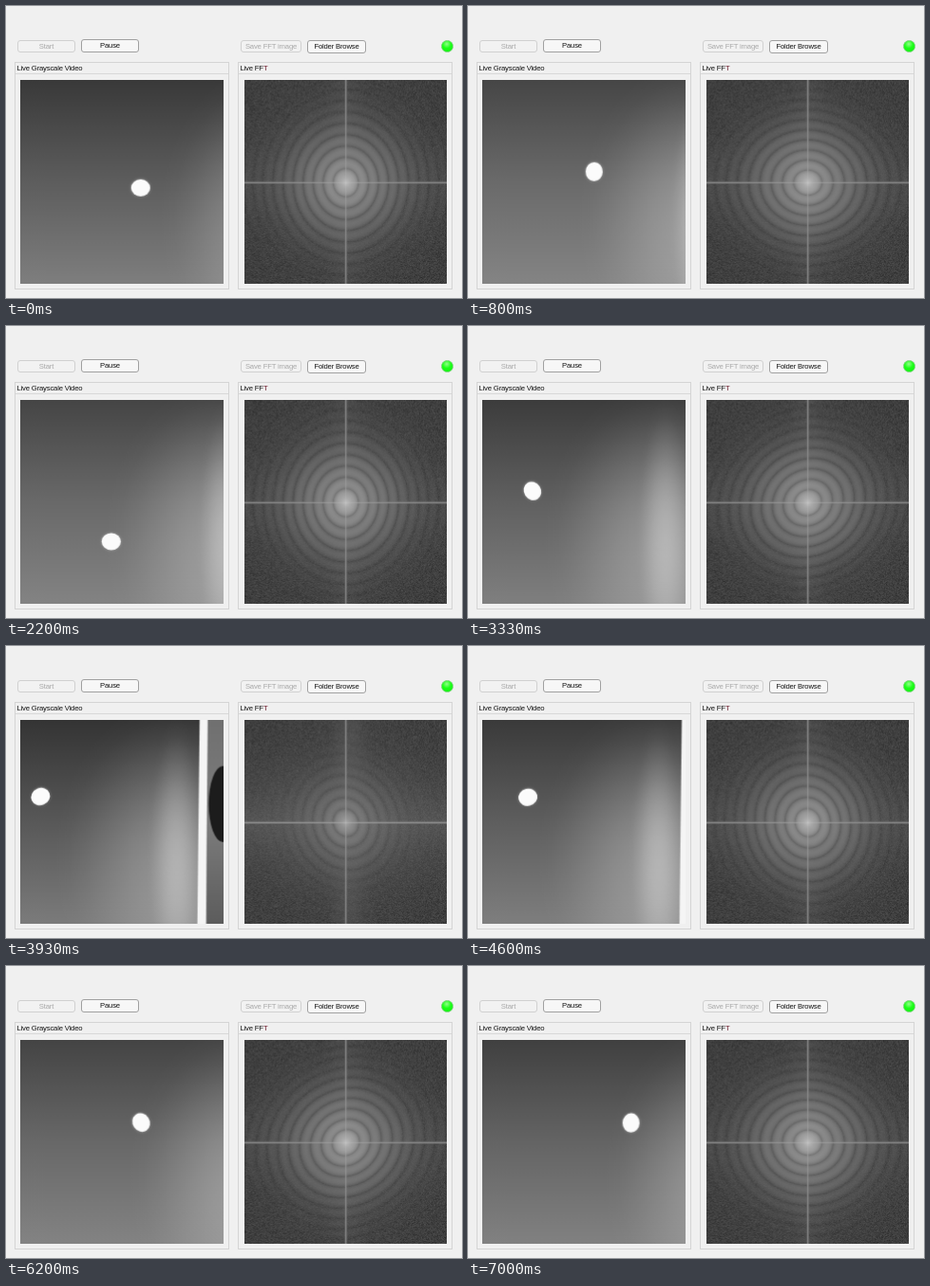
Write an HTML page with a canvas that moves like this. It is 480 px wide and 308 px high and loops after 7070 ms.

```html
<!DOCTYPE html>
<html lang="en">
<head>
<meta charset="utf-8">
<title>Live FFT</title>
<style>
  html, body { margin: 0; width: 480px; height: 308px; overflow: hidden; background: #f0f0f0; }
  body { position: relative; font: 7.7px/12px Arial, "Liberation Sans", sans-serif; letter-spacing: -.18px; color: #111; }
  body > * { position: absolute; box-sizing: border-box; }
  canvas { left: 0; top: 0; }
  .btn { height: 14px; border: 1px solid #a0a0a0; border-radius: 3px; background: #f7f7f7;
         text-align: center; white-space: nowrap; }
  .off { height: 13px; border-color: #d0d0d0; background: #f2f2f2; color: #a8a8a8; line-height: 11px; }
  .panel { top: 59px; width: 226px; height: 240px; border: 1px solid #d4d4d4; }
  .panel div { height: 11px; line-height: 11px; padding-left: 1.5px; border-bottom: 1px solid #d8d8d8; }
  .panel span { color: #6a1a2a; }
  .lamp { left: 457.5px; top: 36px; width: 13px; height: 13px; border-radius: 50%; border: 1px solid #6fd46f;
          background: radial-gradient(circle at 45% 28%, #90ff88, #1cff18 45%, #0cf00c); }
</style>
</head>
<body>
<canvas id="stage" width="480" height="308"></canvas>
<div class="btn off" style="left:12px;top:36px;width:61px">Start</div>
<div class="btn" style="left:79px;top:35px;width:61px">Pause</div>
<div class="btn off" style="left:247px;top:36px;width:64px">Save FFT image</div>
<div class="btn" style="left:317px;top:36px;width:62px">Folder Browse</div>
<div class="lamp"></div>
<div class="panel" style="left:9px"><div>Live Grayscale Video</div></div>
<div class="panel" style="left:244px"><div>Live FF<span>T</span></div></div>
<script>
const W = 214, H = 215, LOOP = 7070, HOLD = 130, STEP = 70.1;
const stage = document.getElementById('stage').getContext('2d');

function buffer() {
  const canvas = document.createElement('canvas');
  canvas.width = W;
  canvas.height = H;
  return canvas.getContext('2d');
}
const video = buffer(), fft = buffer();

// time, ball x, ball y, angle of its long axis, glow x
const keys = [
  [0,    142, 192, 0, 290],
  [800,  132.5, 175.5, 1.6, 243],
  [2200, 110, 227.5, 0, 232],
  [3330, 66, 172.3, 1, 207],
  [3930, 36.7, 159, -.4, 180],
  [5470, 115.7, 164.5, .5, 242],
  [7000, 172, 165.7, 1.6, 272]
];
const RX = 10.1, RY = 9;

// smooth curve through the keys
function pose(t) {
  let i = 0;
  while (i < keys.length - 2 && t > keys[i + 1][0]) i++;
  const b = keys[i], c = keys[i + 1], a = keys[i - 1] || b, d = keys[i + 2] || c;
  const span = c[0] - b[0], s = Math.min(1, (t - b[0]) / span), q = 1 - s;
  const [, x, y, angle, glowX] = b.map((_, k) => {
    const mb = (c[k] - a[k]) / (c[0] - a[0]) * span;
    const mc = (d[k] - b[k]) / (d[0] - b[0]) * span;
    return b[k] * (1 + 2 * s) * q * q + mb * s * q * q + c[k] * s * s * (3 - 2 * s) - mc * s * s * q;
  });
  return { x, y, angle, glowX, post: glowX + 28 };
}

const grey = v => `rgb(${v},${v},${v})`;
const bell = (d, w) => Math.exp(-d * d / (w * w));

function ramp(c, top, mid, bottom) {
  const g = c.createLinearGradient(0, 0, 0, H);
  [top, mid, bottom].forEach((v, i) => g.addColorStop(i / 2, grey(v)));
  return g;
}

function ellipse(c, x, y, rx, ry, tilt, fill) {
  c.beginPath();
  c.ellipse(x, y, rx, ry, tilt, 0, 2 * Math.PI);
  c.fillStyle = fill;
  c.fill();
}

function drawGlow(c, x, y, rx, ry, strength) {
  c.save();
  c.translate(x, y);
  c.scale(rx, ry);
  const light = c.createRadialGradient(0, 0, 0, 0, 0, 1);
  for (let r = 0; r <= 1; r += .125)
    light.addColorStop(r, `rgba(255,255,255,${strength * (1 - r * r) ** 2})`);
  c.fillStyle = light;
  c.fillRect(-1, -1, 2, 2);
  c.restore();
}

function drawVideo({ x, y, angle, glowX, post }) {
  const c = video;
  const exposure = bell(glowX - 245, 45);
  c.save();
  c.fillStyle = ramp(c, 50 + 20 * exposure, 86 + 20 * exposure, 122 + 10 * exposure);
  c.fillRect(0, 0, W, H);
  c.translate(-15, -78);
  drawGlow(c, glowX, 225, 130, 170, .28);
  drawGlow(c, glowX, 225, 32, 150, .3);

  // bright post and the dark shape behind it
  if (post < 236) {
    c.save();
    c.translate(post, 78);
    c.fillStyle = ramp(c, 112, 125, 92);
    c.fillRect(4, 0, 60, H);
    c.filter = 'blur(0.7px)';
    ellipse(c, 21, 89, 15, 40, 0, grey(28));
    c.beginPath();
    c.moveTo(-3.5, -2);
    c.lineTo(5, -2);
    c.lineTo(3, H + 2);
    c.lineTo(-6, H + 2);
    c.fillStyle = grey(245);
    c.fill();
    c.restore();
  }

  c.filter = 'blur(1.3px)';
  ellipse(c, x, y, RX + 1, RY + 1, angle, 'rgba(255,255,255,.15)');
  c.filter = 'blur(0.7px)';
  ellipse(c, x, y, RX, RY, angle, grey(251));
  c.restore();
}

let seed = 9;
const random = () => (seed = seed * 16807 % 2147483647) / 2147483647;
const noise = Float32Array.from({ length: W * H }, () => Math.sqrt(-Math.log(random())));
const image = fft.createImageData(W, H);

// log magnitude of a bright disc, the frame edges and speckle
function drawFft({ angle, post }, frame) {
  const edge = Math.max(0, Math.min(1, (232 - post) / 20));
  const cos = Math.cos(angle), sin = Math.sin(angle);
  const half = W * H >> 1;
  for (let i = 0; i < W * H; i++) {
    const u = i % W - 107, v = Math.floor(i / W) - 108, r = Math.hypot(u, v);
    const phase = 2 * Math.PI / W * Math.hypot(RX * (u * cos + v * sin), RY * (v * cos - u * sin));
    const wave = .2 + .8 * Math.abs(Math.cos(Math.max(0, phase - 2.356)));
    const reach = 1 / (1 + (r / 58) ** 5) + .25 * bell(v, 34) + .2 * bell(u, 16);
    const disc = 2700 * (1 - .7 * edge) * reach * wave / (r ** 1.4 + 6);
    const cross = bell(v, .65) * (42 + 25 * edge + 500 / (Math.abs(u) + 4))
                + bell(u, .65) * (38 + 400 / (Math.abs(v) + 4));
    const streak = edge * Math.exp(-Math.abs(v) / 28);
    const haze = .35 + .7 * bell(r, 90) + 1.1 * edge * bell(u - 4, 15) + 1.6 * streak;
    const n = noise[((i < half ? i : W * H - 1 - i) + frame * 7919) % noise.length];
    const g = Math.min(215, 58 + 20 * Math.log(n * (1 + streak) + disc + cross + haze));
    image.data.set([g, g, g, 255], i * 4);
  }
  fft.putImageData(image, 0, 0);
}

let shown = -1;
function tick() {
  const t = performance.now() % LOOP;
  const frame = t < HOLD ? 0 : Math.min(99, 1 + Math.floor((t - HOLD) / STEP + .06));
  if (frame !== shown) {
    shown = frame;
    const p = pose(frame && HOLD + (frame - 1) * STEP);
    drawVideo(p);
    drawFft(p, frame);
    stage.clearRect(0, 0, 480, 308);
    stage.drawImage(video.canvas, 15, 77.5, 213.5, 215.5);
    stage.drawImage(fft.canvas, 250.5, 77.5, 213.5, 215.5);
  }
  requestAnimationFrame(tick);
}
tick();
</script>
</body>
</html>
```
